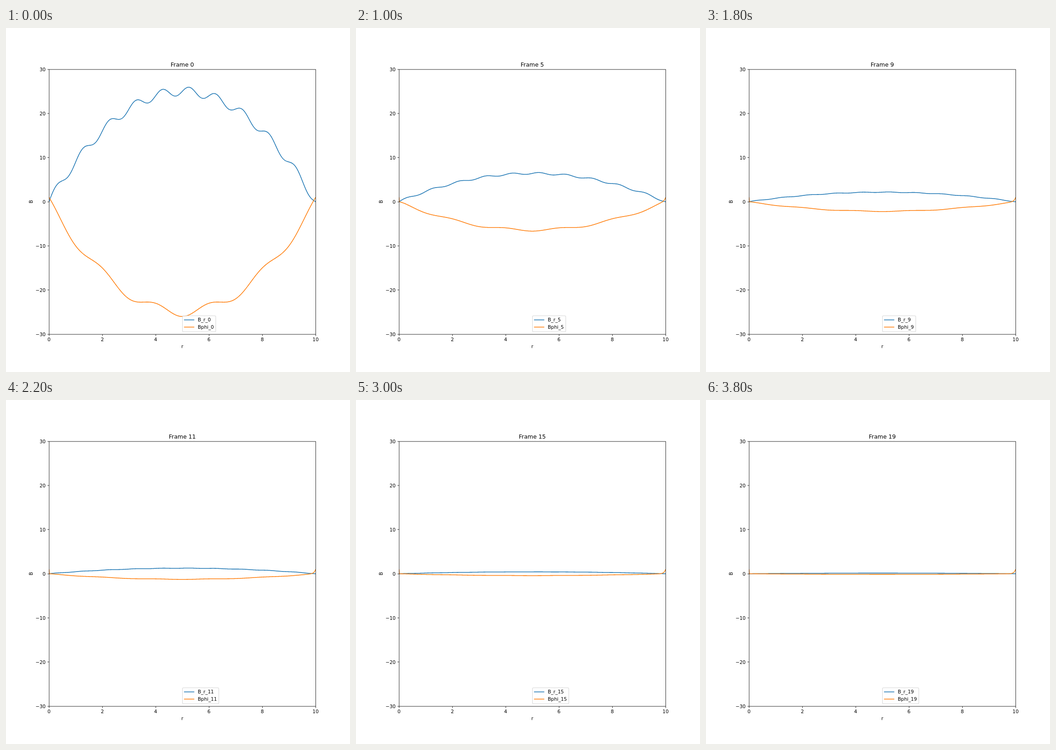
Animation, 748 px wide and 748 px high, one loop 4000 ms. Source, as an HTML page with a canvas:

```html
<!DOCTYPE html>
<html lang="en">
<head>
<meta charset="utf-8">
<title>Field decay</title>
<style>
  html, body { margin: 0; width: 100%; height: 100%; overflow: hidden; background: #fff; }
  canvas { display: block; width: 748px; height: 748px; }
</style>
</head>
<body>
<canvas id="stage" width="748" height="748"></canvas>
<script>
// The chart is laid out on a 1000-unit square at 100 units per inch.
const ctx = document.getElementById("stage").getContext("2d");
const UNITS = 1000, PT = 100 / 72;
const STEPS = 20, STEP_MS = 200, DECAY = 0.272, DIFFUSION = 0.001;
const BLUE = "#1f77b4", ORANGE = "#ff7f0e", FONT = '"DejaVu Sans", sans-serif';
const box = { left: 125, right: 900, top: 120, bottom: 890 };
const mapX = r => box.left + r / 10 * (box.right - box.left);
const mapY = v => box.bottom - (v + 30) / 60 * (box.bottom - box.top);
const snap = p => Math.floor(p + 1e-6) + 0.5;

ctx.scale(748 / UNITS, 748 / UNITS);

function textWidth(str, size) {
  ctx.font = size * PT + "px " + FONT;
  return ctx.measureText(str).width;
}

function text(str, x, y, align = 0, size = 10) {
  const left = x - align * textWidth(str, size);
  ctx.fillStyle = "#000";
  ctx.fillText(str, left, y);
}

function line(x1, y1, x2, y2, color, width) {
  ctx.strokeStyle = color;
  ctx.lineWidth = width * PT;
  ctx.beginPath();
  ctx.moveTo(x1, y1);
  ctx.lineTo(x2, y2);
  ctx.stroke();
}

// Amplitude left after n steps for a wave of wavenumber k.
const damp = (n, k = 0) => Math.exp(-(DECAY + DIFFUSION * k * k) * n);

function radial(r, n) {
  const k = 2 * Math.PI;
  return damp(n) * r * (10 - r) + damp(n, k) * Math.sin(k * r);
}

// The azimuthal field is held at 1 on both walls, with a thin layer beside each.
function azimuthal(r, n) {
  const k = Math.PI;
  const core = damp(n, k) * Math.cos(k * r) - damp(n) * r * (10 - r);
  if (n === 0) return core;
  if (r === 0) return 1;
  const inner = Math.sqrt(4 * DIFFUSION * n) / 0.886;
  const outer = Math.sqrt(DIFFUSION / DECAY) * Math.tanh(0.886 * Math.sqrt(DECAY * n));
  return core - damp(n, k) * Math.exp(-r / inner)
    + (1 - damp(n, k)) * Math.exp((r - 10) / outer);
}

function curve(field, n, color) {
  ctx.strokeStyle = color;
  ctx.lineWidth = 1.5 * PT;
  ctx.lineJoin = "round";
  ctx.beginPath();
  for (let i = 0; i <= 1000; i++) {
    const r = i / 100;
    ctx.lineTo(mapX(r), mapY(field(r, n)));
  }
  ctx.stroke();
}

function axes() {
  const l = snap(box.left), r = snap(box.right), t = snap(box.top), b = snap(box.bottom);
  const len = 3.5 * PT;
  for (let v = 0; v <= 10; v += 2) {
    const x = snap(mapX(v));
    line(x, b, x, b + len, "#000", 0.8);
    text(String(v), mapX(v), 911, 0.5);
  }
  for (let v = -30; v <= 30; v += 10) {
    const y = snap(mapY(v));
    line(l - len, y, l, y, "#000", 0.8);
    text(v < 0 ? "\u2212" + -v : String(v), box.left - 2 * len, Math.round(mapY(v) + 5.5), 1);
  }
  ctx.strokeStyle = "#000";
  ctx.lineWidth = 0.8 * PT;
  ctx.lineJoin = "miter";
  ctx.strokeRect(l, t, r - l, b - t);
  text("r", 512.5, 930, 0.5);
  ctx.save();
  ctx.translate(78, 505);
  ctx.rotate(-Math.PI / 2);
  text("B", 0, 0, 0.5);
  ctx.restore();
}

function legend(n) {
  const em = 10 * PT, left = 513, top = 836.5;
  const x = left + 0.4 * em;
  const labelX = x + 2.8 * em;
  const rows = [["B_r_" + n, BLUE], ["Bphi_" + n, ORANGE]];
  ctx.beginPath();
  ctx.roundRect(left, top, 3.6 * em + textWidth(rows[1][0], 10), 46.5, 0.2 * em);
  ctx.fillStyle = "rgba(255,255,255,0.8)";
  ctx.fill();
  ctx.strokeStyle = "rgba(204,204,204,0.8)";
  ctx.lineWidth = PT;
  ctx.stroke();
  rows.forEach(([label, color], i) => {
    const base = 853.4 + 21 * i;
    line(x - PT * 0.75, base - 4.9, x + 2 * em + PT * 0.75, base - 4.9, color, 1.5);
    text(label, labelX, base);
  });
}

function draw(n) {
  ctx.fillStyle = "#fff";
  ctx.fillRect(0, 0, UNITS, UNITS);
  ctx.save();
  ctx.beginPath();
  ctx.rect(box.left, box.top, box.right - box.left, box.bottom - box.top);
  ctx.clip();
  curve(radial, n, BLUE);
  curve(azimuthal, n, ORANGE);
  ctx.restore();
  axes();
  text("Frame " + n, 512.5, 112, 0.5, 12);
  legend(n);
}

const start = performance.now();
function tick() {
  const elapsed = Math.max(0, performance.now() - start);
  draw(Math.floor(elapsed / STEP_MS) % STEPS);
  requestAnimationFrame(tick);
}
tick();
</script>
</body>
</html>
```
